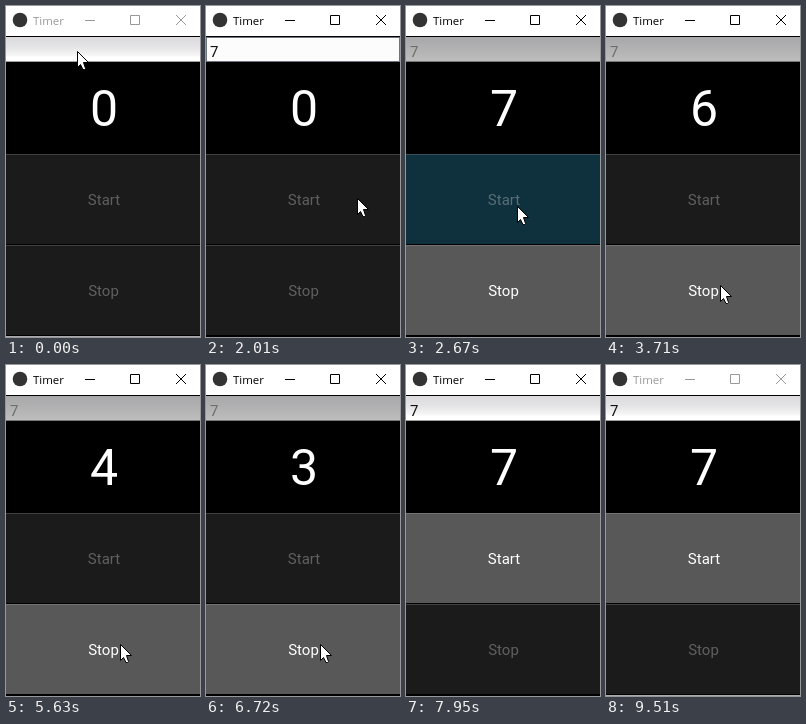
These frames come from a looping animation (194 by 331 pixels, 9.61 s). An HTML page:

```html
<!DOCTYPE html>
<html lang="en">
<head>
<meta charset="utf-8">
<title>Timer</title>
<style>
  html, body { margin: 0; width: 100%; height: 100%; overflow: hidden; background: #000; }
  svg { display: block; width: 194px; height: 331px; }
  rect { shape-rendering: crispEdges; }
  text { font-family: Roboto, sans-serif; font-size: 15px; }
  .mid { text-anchor: middle; fill: #fff; }
  #title { font: 11.4px "Open Sans", sans-serif; }
  #count { font-size: 50px; }
</style>
</head>
<body>
<svg viewBox="0 0 194 331">
  <defs>
    <linearGradient id="shade" x2="0" y2="1">
      <stop offset="0" stop-color="#dcdadd"/>
      <stop offset=".4" stop-color="#e4e3e5"/>
      <stop offset=".75" stop-color="#f5f5f5"/>
      <stop offset=".85" stop-color="#fff"/>
    </linearGradient>
    <linearGradient id="locked" x2="0" y2="1">
      <stop offset="0" stop-color="#a8a7a9"/>
      <stop offset="1" stop-color="#bdbdbd"/>
    </linearGradient>
  </defs>

  <rect width="194" height="331"/>
  <rect width="194" height="30" fill="#fff"/>
  <rect id="border" y="330" width="194" height="1" fill="#aaa"/>
  <circle cx="14" cy="14" r="7.3" fill="#333"/>
  <text id="title" x="27" y="18.8">Timer</text>
  <g id="controls" fill="none">
    <path d="M79 14.5h10M124.5 9.5h9v9h-9z"/>
    <path d="M170 9l10 10M180 9l-10 10"/>
  </g>

  <rect id="field" y="31" width="194" height="24"/>
  <rect id="base" y="55" width="194" height="1"/>
  <rect id="ring" x=".5" y="31.5" width="193" height="24" fill="none" stroke="#6c7480"/>
  <text id="value" x="4" y="51">7</text>
  <rect id="caret" y="36" width="1" height="17" fill="#f00"/>

  <text id="count" class="mid" x="98" y="120"></text>

  <g id="start" transform="translate(0 148)">
    <rect width="194" height="90"/>
    <rect width="194" height="1" fill="#fff" opacity=".16"/>
    <text class="mid" x="98" y="51">Start</text>
  </g>
  <g id="stop" transform="translate(0 239)">
    <rect width="194" height="90"/>
    <rect width="194" height="1" fill="#fff" opacity=".16"/>
    <text class="mid" x="97.5" y="51">Stop</text>
  </g>

  <path id="pointer" d="M.5 .5V16.5L3.5 13.5L6 18.5H7.5L8.5 17.5L6.5 11.5H11.5Z" fill="#fff" stroke="#000"/>
</svg>
<script>
const LOOP = 9610, STEP = 125, SECOND = 960, BLINK = 500;

// Moments of the session, in ms
const ACTIVATE = 300, FOCUS = 670, TYPE = 1500, ENTER = 2130,
      PRESS = 2670, RELEASE = 2790, STOP = 7000, LEAVE = 7950, DEACTIVATE = 9510;
const FIRST_TICK = 3710;

// The pointer glides to each goal in a few visible steps.
const home = [71, 45];
const glides = [
  { from: 1230, steps: 5, to: [151, 192], power: 2.5 },
  { from: 2280, steps: 3, to: [111, 200], power: 1 },
  { from: 3040, steps: 4, to: [114, 279], power: 0.7 },
  { from: 7250, steps: 2, to: [133, 293], power: 1 },
  { from: 7680, steps: 2, to: [156, 312], power: 1 }
];

const $ = id => document.getElementById(id);
const set = (id, attrs) => { for (const k in attrs) $(id).setAttribute(k, attrs[k]); };
const show = (id, on) => set(id, { visibility: on ? 'visible' : 'hidden' });

function pointerAt(t) {
  let pos = home;
  for (const { from, steps, to, power } of glides) {
    if (t < from) break;
    const step = Math.min(steps, Math.floor((t - from) / STEP) + 1);
    const p = (step / steps) ** power;
    pos = pos.map((v, i) => Math.round(v + (to[i] - v) * p));
  }
  return pos;
}

function countAt(t) {
  if (t < PRESS) return 0;
  if (t >= STOP) return 7;
  return 7 - Math.max(0, Math.floor((t - FIRST_TICK) / SECOND) + 1);
}

function drawButton(id, on, down) {
  const { firstElementChild: face, lastElementChild: label } = $(id);
  face.setAttribute('fill', down ? '#0f303d' : on ? '#585858' : '#1b1b1b');
  label.setAttribute('fill-opacity', on ? 1 : 0.3);
}

function draw(t) {
  const active = t >= ACTIVATE && t < DEACTIVATE;
  const focused = t >= FOCUS && t < ENTER;
  const running = t >= PRESS && t < STOP;
  const typed = t >= TYPE;
  const ink = active ? '#000' : '#999';

  set('title', { fill: ink });
  set('controls', { stroke: ink });
  show('border', !active);

  set('field', { fill: focused ? '#fcfcfd' : running ? 'url(#locked)' : 'url(#shade)' });
  set('base', { fill: running ? '#777' : '#a0a0a0' });
  show('ring', focused);
  set('value', { fill: running ? '#6e6e6e' : '#111' });
  show('value', typed);

  const sinceKey = t - (typed ? TYPE : FOCUS);
  set('caret', { x: typed ? 13 : 5 });
  show('caret', focused && sinceKey % (2 * BLINK) < BLINK);

  $('count').textContent = countAt(t);
  drawButton('start', t >= ENTER && !running, t >= PRESS && t < RELEASE);
  drawButton('stop', running);

  set('pointer', { transform: `translate(${pointerAt(t)})` });
  show('pointer', t < LEAVE);
}

const origin = performance.now();
function tick() {
  draw((performance.now() - origin) % LOOP);
  requestAnimationFrame(tick);
}
tick();
</script>
</body>
</html>
```
